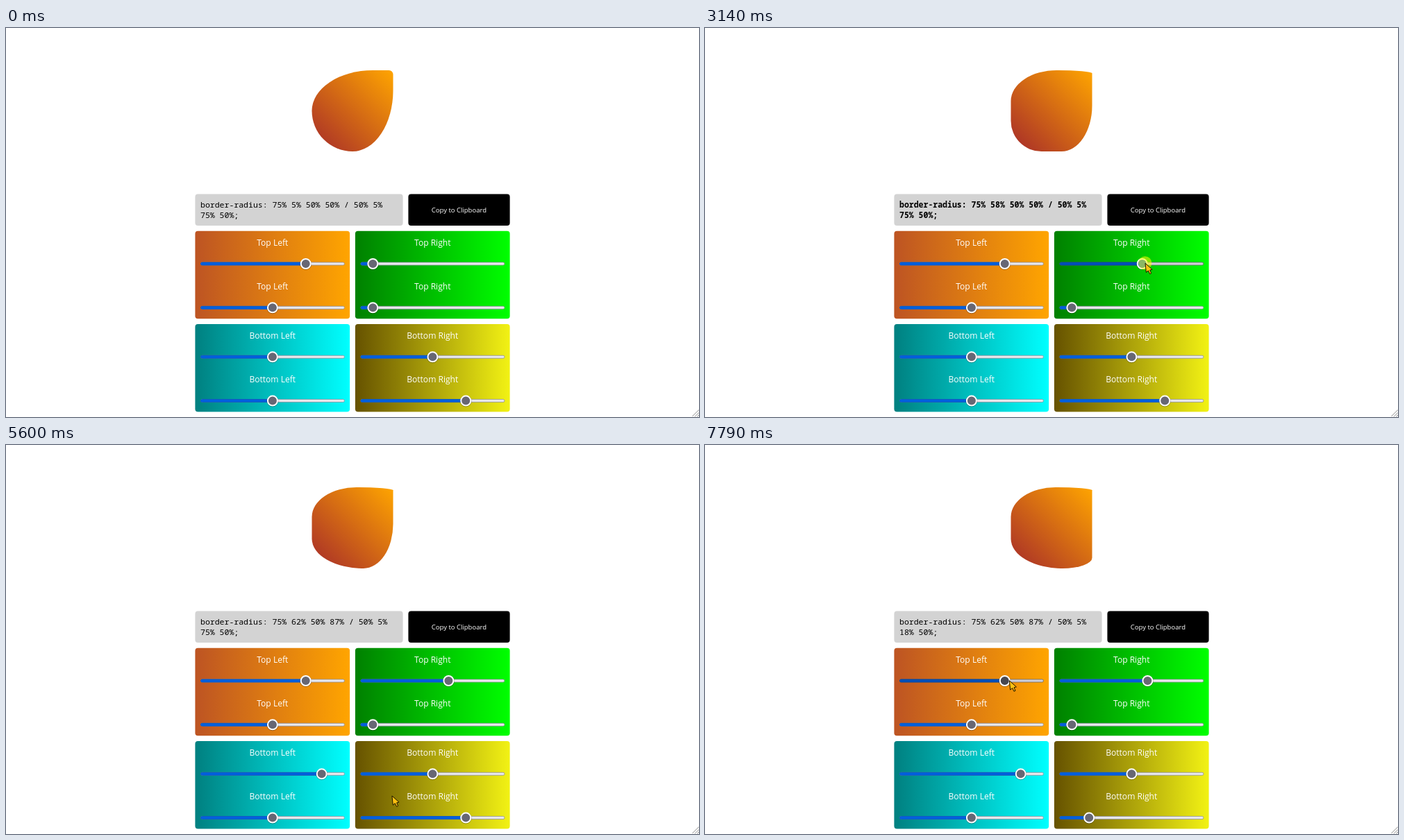
An HTML page that plays this animation: 998 px wide and 561 px high, repeating every 8 s.

```html
<!DOCTYPE html>
<html lang="en">
<head>
<meta charset="utf-8">
<title>Border radius generator</title>
<style>
html, body { margin: 0; width: 100%; height: 100%; overflow: hidden; background: #fff; }
svg, #shape { position: absolute; left: 0; top: 0; }
#shape {
  width: 117px; height: 117px; transform: translate(440.5px, 61px);
  background: linear-gradient(45deg, brown, orange);
}
text { font-family: "Open Sans", "Noto Sans", sans-serif; fill: #fff; }
.label { font-size: 12.06px; text-anchor: middle; }
.copy { font-size: 9.5px; text-anchor: middle; }
.code { font: 500 11.5px "Noto Sans Mono", "DejaVu Sans Mono", monospace; fill: #000; }
.held .code { font-weight: 700; }
</style>
</head>
<body>
<div id="shape"></div>
<svg id="scene" width="998" height="561" viewBox="0 0 998 561"></svg>
<script>
const LOOP = 8000, TICK = 70, LAG = 130, TRACK = 207, THUMB = 15.7;
const LEFT = 272.4, COLUMN = 222.7, GAP = 7.8;

const panels = [
  ['Top Left', '#bd5423', '#ffa500'],
  ['Top Right', '#008000', '#00ff00'],
  ['Bottom Left', '#008080', '#00ffff'],
  ['Bottom Right', '#665200', '#f2f214']
];
const rest = [75, 50, 5, 5, 50, 50, 50, 75];

// Pointer moves; a drag also names its slider and final value
const entry = { x: 952, y: 556 };
const moves = [
  { from: 510, to: 1360, x: 538, y: 324 },
  { from: 1360, to: 1710, x: 533, y: 335 },
  { from: 2020, to: 3300, x: 636, y: 339, slider: 2, value: 62 },
  { from: 3530, to: 4310, x: 389.5, y: 476 },
  { from: 4340, to: 5280, x: 454, y: 472, slider: 4, value: 87 },
  { from: 5320, to: 6080, x: 659, y: 540 },
  { from: 6140, to: 7040, x: 548, y: 530, slider: 7, value: 18 },
  { from: 7170, to: 7790, x: 438, y: 339.5 }
];

const shape = document.getElementById('shape');
const scene = document.getElementById('scene');

function set(el, attrs) {
  for (const k in attrs) el.setAttribute(k, attrs[k]);
}

function draw(tag, attrs, parent = scene) {
  const el = document.createElementNS('http://www.w3.org/2000/svg', tag);
  set(el, attrs);
  return parent.appendChild(el);
}

function write(cls, x, y, text = '') {
  const el = draw('text', { class: cls, x, y });
  el.textContent = text;
  return el;
}

function card(x, y, width, height, fill) {
  draw('rect', { x, y, width, height, rx: 4, fill });
}

function gradient(id, from, to) {
  const g = draw('linearGradient', { id });
  draw('stop', { 'stop-color': from }, g);
  draw('stop', { offset: 1, 'stop-color': to }, g);
  return `url(#${id})`;
}

function makeSlider(x, y) {
  const bar = { x, y: y - 2, height: 4, rx: 2, 'stroke-width': 0.8 };
  return {
    x, y,
    track: draw('rect', { ...bar, width: TRACK }),
    fill: draw('rect', bar),
    shade: draw('circle', { cy: y + 0.5, r: 8.4, fill: 'rgba(0,0,0,.3)' }),
    thumb: draw('circle', { cy: y, r: 7, stroke: '#fff', 'stroke-width': 2 })
  };
}

card(LEFT, 239.4, 299.2, 45.6, '#d3d3d3');
card(579.4, 239.4, 146.2, 45.6, '#000');
write('copy', 652.4, 266, 'Copy to Clipboard');
const lines = [259, 274].map(y => write('code', 280, y));

const sliders = panels.flatMap(([name, from, to], i) => {
  const x = LEFT + (i % 2) * (COLUMN + GAP);
  const y = 292.8 + (i > 1) * 134.3;
  card(x, y, COLUMN, 126.4, gradient('panel' + i, from, to));
  return [47.2, 110.5].map(dy => {
    write('label', x + COLUMN / 2, Math.round(y + dy - 26.2), name);
    return makeSlider(x + 8, y + dy);
  });
});

draw('path', { d: 'M988.5 560 L998 550.5 M992 560.5 L998 554.5 M995.5 560.5 L998 558', stroke: '#888' });
const halo = draw('circle', { r: 9.7, fill: 'rgba(255,255,0,.55)' });
const pointer = draw('path', {
  d: 'M.3 .3 L1.7 13.6 L4.6 11 L7 15.8 L9 14.8 L7 10.2 L10.4 9.4 Z',
  fill: '#ffc010', stroke: '#1a1400', 'stroke-linejoin': 'round'
});

// Quick start, long settle
function progress(move, t) {
  const u = Math.min(1, Math.max(0, (t - move.from) / (move.to - move.from))) ** 0.7;
  return u * u * (3 - 2 * u);
}

const mix = (a, b, p) => a + (b - a) * p;

function paintSlider(s, value, over, held) {
  const lit = over || held;
  const cx = s.x + THUMB / 2 + (TRACK - THUMB) * value / 100;
  set(s.track, { fill: lit ? '#d0d0d7' : '#e9e9ed', stroke: lit ? '#676774' : '#8f8f9d' });
  set(s.fill, { width: cx - s.x, fill: lit ? '#0250bb' : '#0060df', stroke: lit ? '#054096' : '#0250bb' });
  set(s.shade, { cx });
  set(s.thumb, { cx, fill: held ? '#0060df' : over ? '#484851' : '#676774' });
}

function render(time) {
  const values = rest.slice();
  let { x, y } = entry, held = -1;
  for (const move of moves) {
    // The picture refreshes once per tick while the pointer moves
    const steps = Math.floor((time - move.from) / TICK);
    if (steps < 1) break;
    const t = move.from + steps * TICK;
    const p = time >= move.to ? 1 : progress(move, t);
    x = mix(x, move.x, p);
    y = mix(y, move.y, p);
    held = move.slider ?? -1;
    if (held >= 0) values[held] = Math.round(mix(rest[held], move.value, progress(move, t - LAG)));
  }
  const shown = time >= moves[0].from + TICK;

  sliders.forEach((s, i) => {
    const over = shown && held < 0 && x >= s.x && x <= s.x + TRACK && Math.abs(y - s.y) < 6.5;
    paintSlider(s, values[i], over, i === held);
  });

  const pick = order => order.map(i => values[i] + '%');
  const across = pick([0, 2, 6, 4]).join(' ');
  const [tl, tr, br, bl] = pick([1, 3, 7, 5]);
  shape.style.borderRadius = `${across} / ${tl} ${tr} ${br} ${bl}`;
  lines[0].textContent = `border-radius: ${across} / ${tl} ${tr}`;
  lines[1].textContent = `${br} ${bl};`;
  scene.classList.toggle('held', held >= 0);

  set(halo, { cx: x, cy: y, visibility: held < 0 ? 'hidden' : 'visible' });
  set(pointer, { transform: `translate(${x} ${y})`, visibility: shown ? 'visible' : 'hidden' });
}

const start = performance.now();
function tick() {
  render((performance.now() - start) % LOOP);
  requestAnimationFrame(tick);
}
tick();
</script>
</body>
</html>
```
